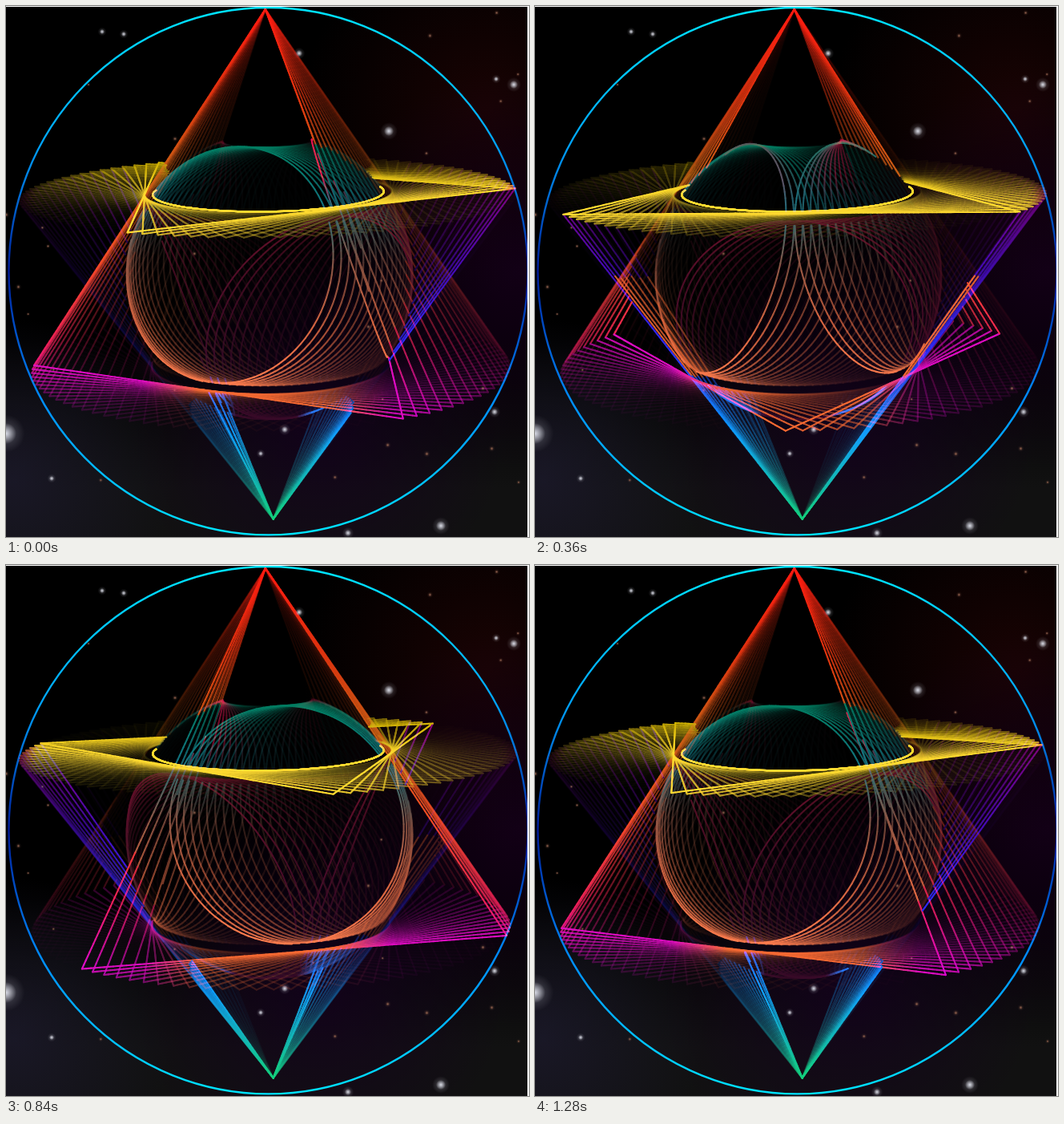
Write an HTML page with a canvas that moves like this. It is 653 px wide and 662 px high and loops after 1320 ms.

```html
<!DOCTYPE html>
<html lang="en">
<head>
<meta charset="utf-8">
<title>Star tetrahedron</title>
<style>
html, body { margin: 0; width: 100%; height: 100%; overflow: hidden; background: #000; }
canvas { display: block; width: 653px; height: 662px; }
</style>
</head>
<body>
<canvas id="stage" width="653" height="662"></canvas>
<script>
const W = 653, H = 662, LOOP = 1320, STEPS = 33, TRAIL = 31, FADE = 0.87;
const CX = 329, CY = 337, SIN = 0.2055, COS = 0.9787, PERSP = 0.00044, ROLL = 0.0155;
const BALL = 178, RAD = Math.PI / 180;
const CAM = [0, SIN / PERSP, COS / PERSP];

const clamp = (v, a = 0, b = 1) => Math.min(b, Math.max(a, v));
const dot = (a, b) => a[0] * b[0] + a[1] * b[1] + a[2] * b[2];
const sub = (a, b) => a.map((v, i) => v - b[i]);
const mix = (a, b, t) => a.map((v, i) => v + (b[i] - v) * t);
const cross = (a, b) => [a[1] * b[2] - a[2] * b[1], a[2] * b[0] - a[0] * b[2], a[0] * b[1] - a[1] * b[0]];
const unit = a => a.map(v => v / Math.hypot(...a));
const css = c => `rgb(${c.map(Math.round).join()})`;
const rgb = hex => [1, 3, 5].map(i => parseInt(hex.slice(i, i + 2), 16));

// Evenly spaced colours between two heights.
function ramp(top, bottom, ...hexes) {
  const cs = hexes.map(rgb), n = cs.length - 1;
  return y => {
    const t = clamp((y - top) / (bottom - top)) * n, i = Math.min(n - 1, Math.floor(t));
    return mix(cs[i], cs[i + 1], t - i);
  };
}

const upEdge = ramp(4, 530, '#ff1a10', '#e0320f', '#c85f14', '#f54b25', '#ee2058', '#d700f0');
const ballArc = ramp(170, 470, '#007d5f', '#12707c', '#8a5544', '#d26440', '#ff7d4e');
const downEdge = ramp(225, 639, '#800078', '#460ab4', '#2d2dff', '#00a0ff', '#00cd7d');
const downArc = ramp(265, 450, '#641028', '#380a28');
const ORANGE = rgb('#f56932'), CRIMSON = rgb('#e11450'), MAGENTA = rgb('#dc0cc0');
const GOLD = rgb('#ffda30'), OLIVE = rgb('#cdaf00'), BLUE = rgb('#2878f5');

function project([x, y, z]) {
  const s = 1 / (1 - (y * SIN + z * COS) * PERSP);
  const px = x * s, py = (y * COS - z * SIN) * s;
  return [CX + px - ROLL * py, CY - py - ROLL * px];
}

// Ring vertices 0-2, apex 3; face i lies opposite vertex i.
function tetra(angle, radius, level, apex) {
  const az = [0, 1, 2].map(i => ((angle + i * 120 + 180) % 360 + 360) % 360 - 180);
  const v = az.map(a => [radius * Math.sin(a * RAD), level, radius * Math.cos(a * RAD)]);
  v.push([0, apex, 0]);
  const faces = v.map((_, i) => {
    const [a, b, c] = v.filter((_, j) => j !== i);
    let n = unit(cross(sub(b, a), sub(c, a)));
    if (dot(n, a) < 0) n = n.map(k => -k);
    const d = dot(n, a);
    return { n, d, front: dot(n, CAM) > d, az: Math.atan2(n[0], n[2]) / RAD };
  });
  return { v, az, faces };
}

function hidden(p, solids) {
  const dir = unit(sub(CAM, p));
  const b = dot(p, dir), q = b * b - dot(p, p) + (BALL - 1.5) ** 2;
  if (q > 0 && Math.sqrt(q) - b > 1) return true;
  return solids.some(({ faces }) => {
    let near = 0, far = 1e5;
    for (const { n, d } of faces) {
      const gap = d - 1.5 - dot(n, p), rate = dot(n, dir);
      if (Math.abs(rate) < 1e-9) { if (gap < 0) return false; }
      else if (rate > 0) far = Math.min(far, gap / rate);
      else near = Math.max(near, gap / rate);
    }
    return far - near > 0.5;
  });
}

function trace(g, at, solids, color, skip) {
  const count = 100;
  let last = null;
  for (let i = 0; i <= count; i++) {
    const p = at(i / count);
    if ((skip && skip(p)) || hidden(p, solids)) { last = null; continue; }
    const s = project(p);
    if (last) {
      g.strokeStyle = css(color(...s));
      g.beginPath();
      g.moveTo(...last);
      g.lineTo(...s);
      g.stroke();
    }
    last = s;
  }
}

// Circle where a face plane cuts the ball.
function ringOn({ n, d }) {
  const r = Math.sqrt(BALL * BALL - d * d);
  const u = unit(cross(n, Math.abs(n[1]) > 0.9 ? [1, 0, 0] : [0, 1, 0])), w = cross(n, u);
  return t => {
    const c = r * Math.cos(t * 2 * Math.PI), s = r * Math.sin(t * 2 * Math.PI);
    return n.map((k, i) => k * d + u[i] * c + w[i] * s);
  };
}

const upColor = (x, y) =>
  (y > 168 && Math.hypot(x - CX, y - CY) < 172 ? ballArc : upEdge)(y);

const baseColor = x => mix(ORANGE, MAGENTA, clamp((Math.abs(x - CX) - 85) / 70));

const goldColor = (x, y) =>
  mix(mix(OLIVE, GOLD, clamp((y - 195) / 40)), CRIMSON, clamp((Math.abs(x - CX) - 292) / 25));

const downArcColor = (x, y) =>
  mix(downArc(y), BLUE, clamp((y - 465) / 8) * clamp((Math.abs(x - CX) - 40) / 20));

function layer() {
  const c = document.createElement('canvas');
  c.width = W;
  c.height = H;
  return c;
}

function pose(step) {
  const c = layer(), g = c.getContext('2d');
  g.lineWidth = 2.1;
  g.lineCap = 'round';
  const turn = -30.5 - step * 120 / STEPS;
  const down = tetra(turn, 305, 106.5, -318), up = tetra(turn + 60, 299, -110.5, 330);
  const solids = [up, down];
  const edge = (s, a, b) => t => mix(s.v[a], s.v[b], t);

  for (const f of down.faces.slice(0, 3)) trace(g, ringOn(f), solids, downArcColor);
  for (const f of up.faces.slice(0, 3)) {
    const side = clamp((Math.abs(f.az) - 52) / 30);
    trace(g, ringOn(f), solids, (x, y) => mix(ballArc(y), CRIMSON, side * clamp((255 - y) / 40)));
  }

  // Slanted edges show only on the silhouette.
  for (let i = 0; i < 3; i++) {
    const j = (i + 1) % 3, k = (i + 2) % 3, az = Math.abs(down.az[i]);
    if (up.faces[j].front !== up.faces[k].front) trace(g, edge(up, 3, i), solids, upColor);
    if (up.faces[k].front) trace(g, edge(up, i, j), solids, baseColor);
    if (down.faces[j].front !== down.faces[k].front)
      trace(g, edge(down, i, 3), solids,
        (x, y) => az < 62 && y > 340 && y < 465 ? ORANGE : downEdge(y),
        p => az < 40 && p[1] > -110);
    trace(g, edge(down, i, j), solids, goldColor);
  }
  trace(g, ringOn(down.faces[3]), solids, () => GOLD);
  return c;
}

function randomizer(seed) {
  return () => (seed = seed * 16807 % 2147483647) / 2147483647;
}

function backdrop() {
  const c = layer(), g = c.getContext('2d');
  g.fillStyle = '#000';
  g.fillRect(0, 0, W, H);
  const glow = (x, y, r, hex, a) => {
    const q = g.createRadialGradient(x, y, 0, x, y, r), col = rgb(hex);
    q.addColorStop(0, `rgba(${col},${a})`);
    q.addColorStop(1, `rgba(${col},0)`);
    g.fillStyle = q;
    g.fillRect(x - r, y - r, 2 * r, 2 * r);
  };
  const low = g.createLinearGradient(0, 420, 0, 600);
  low.addColorStop(0, 'rgba(17,17,17,0)');
  low.addColorStop(1, 'rgb(17,17,17)');
  g.fillStyle = low;
  g.fillRect(0, 420, W, H - 420);
  glow(600, 130, 230, '#200404', 0.8);
  glow(640, 330, 250, '#140018', 0.9);
  glow(390, 520, 240, '#14001e', 0.8);
  glow(10, 590, 200, '#1a1828', 0.9);

  const star = (x, y, r, hex) => {
    glow(x, y, r * 1.8, hex, 0.3);
    glow(x, y, r, hex, 1);
  };
  const bright = [[0, 533, 13], [478, 156, 6], [543, 648, 6], [634, 98, 5], [610, 506, 4], [366, 59, 4],
    [348, 528, 4], [427, 657, 4], [318, 558, 3], [120, 32, 3], [147, 35, 3], [57, 589, 3], [612, 91, 3]];
  bright.forEach(s => star(...s, '#d8dae4'));
  const rnd = randomizer(41);
  for (let i = 0; i < 26; i++) star(rnd() * W, rnd() * H, 1.4 + rnd(), '#90604c');

  const rim = g.createLinearGradient(0, 0, 0, H);
  ['#00e5ff', '#00a8ff', '#001a98', '#0090ff', '#00e5ff'].forEach((s, i) => rim.addColorStop(i / 4, s));
  g.strokeStyle = rim;
  g.lineWidth = 2.4;
  g.beginPath();
  g.ellipse(327.5, 330.7, 324, 328.7, 0, 0, 2 * Math.PI);
  g.stroke();
  return c;
}

const ctx = document.getElementById('stage').getContext('2d');
const sky = backdrop();
const poses = Array.from({ length: STEPS }, (_, i) => pose(i));

function draw(step) {
  ctx.globalAlpha = 1;
  ctx.globalCompositeOperation = 'source-over';
  ctx.drawImage(sky, 0, 0);
  ctx.globalCompositeOperation = 'lighten';
  for (let k = TRAIL; k >= 0; k--) {
    ctx.globalAlpha = FADE ** k;
    ctx.drawImage(poses[(step - k + STEPS) % STEPS], 0, 0);
  }
  ctx.globalAlpha = 1;
  ctx.globalCompositeOperation = 'source-over';
  ctx.fillStyle = '#fff';
  ctx.fillRect(0, 0, W, 1);
  ctx.fillRect(651, 0, 2, H);
}

const start = performance.now();
let shown = -1;
function tick() {
  const step = Math.floor((performance.now() - start) % LOOP / LOOP * STEPS);
  if (step !== shown) draw(shown = step);
  requestAnimationFrame(tick);
}
tick();
</script>
</body>
</html>
```
